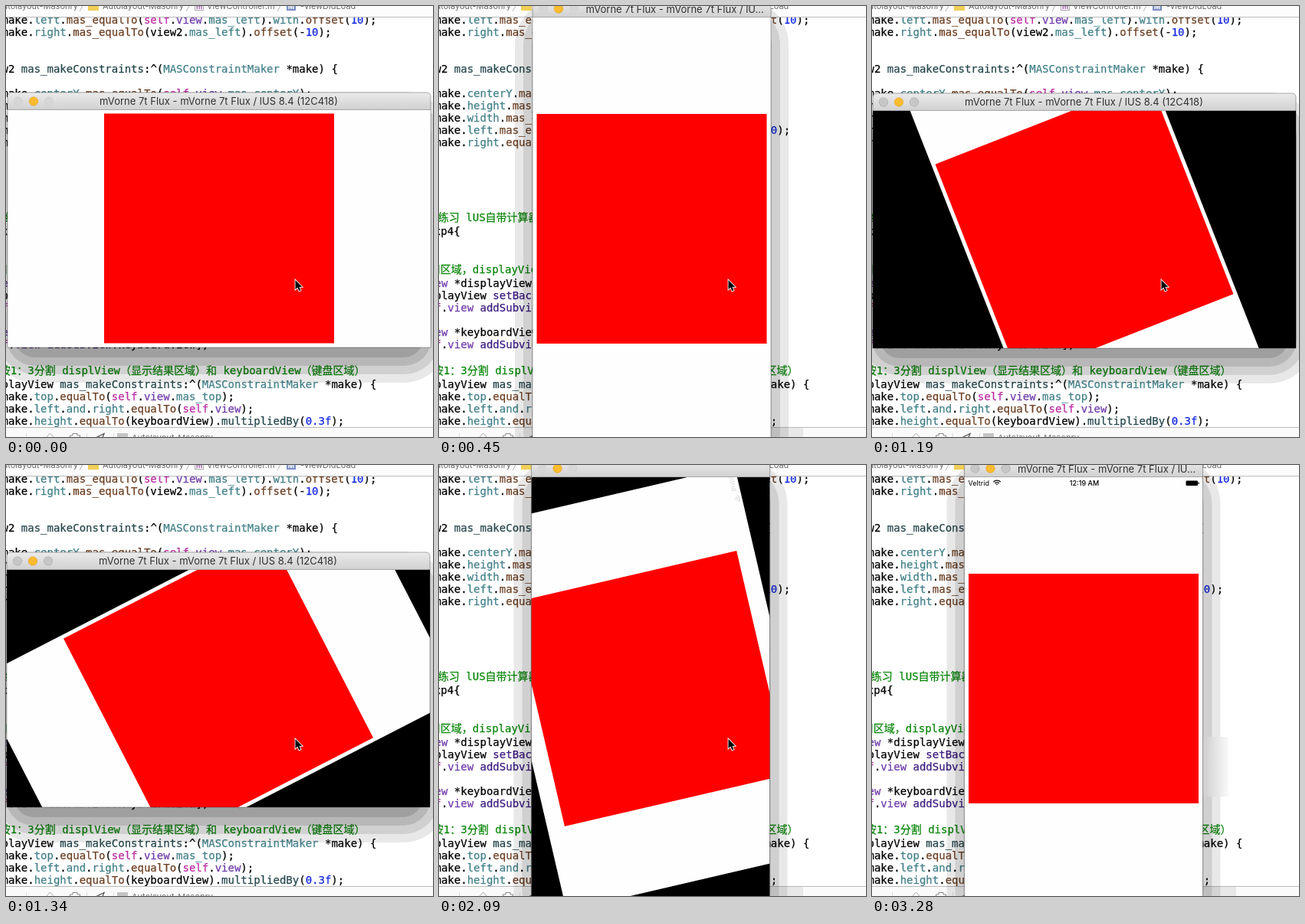
Write an HTML page with a canvas that moves like this. It is 557 px wide and 563 px high and loops after 3960 ms.

```html
<!DOCTYPE html>
<html lang="en">
<head>
<meta charset="utf-8">
<title>Rotating window</title>
<style>
html, body { margin: 0; width: 100%; height: 100%; overflow: hidden; background: #fff; }
canvas { display: block; width: 557px; height: 563px; }
</style>
</head>
<body>
<canvas id="stage" width="557" height="563"></canvas>
<script>
const ctx = document.getElementById('stage').getContext('2d');
const W = 557, H = 563, LOOP = 3960;
const LONG = 552, SHORT = 311, BAR = 23, SQUARE = 300;
const MONO = '14px "DejaVu Sans Mono", "Noto Sans CJK SC", "Noto Sans CJK", monospace';
const SANS = 'Inter, Roboto, sans-serif';
const DEVICE = 'mVorne 7t Flux - mVorne 7t Flux / ';

// Source code behind the window: [baseline, x, text]
const IN = -5.5, OUT = -39.2;
const CODE = [
  [23, IN, 'make.left.mas_equalTo(self.view.mas_left).with.offset(10);'],
  [39, IN, 'make.right.mas_equalTo(view2.mas_left).offset(-10);'],
  [87, OUT, '[view2 mas_makeConstraints:^(MASConstraintMaker *make) {'],
  [119, IN, 'make.centerY.mas_equalTo(self.view.mas_centerY);'],
  [135, IN, 'make.height.mas_equalTo(100);'],
  [151, IN, 'make.width.mas_equalTo(100);'],
  [167, IN, 'make.left.mas_equalTo(view1.mas_right).with.offset(10);'],
  [183, IN, 'make.right.equalTo(self.view);'],
  [281, -18, '//练习 lUS自带计算器'],
  [299, -82, '- (void)exp4{'],
  [349, -29, '//用区域，displayView'],
  [367, OUT, 'UIView *displayView = [UIView new];'],
  [383, OUT, '[displayView setBackgroundColor:color];'],
  [399, OUT, '[self.view addSubview:displayView];'],
  [431, OUT, 'UIView *keyboardView = [UIView new];'],
  [447, OUT, '[self.view addSubview:keyboardView];'],
  [481, -25, '//按1：3分割 displView（显示结果区域）和 keyboardView（键盘区域）'],
  [499, OUT, '[displayView mas_makeConstraints:^(MASConstraintMaker *make) {'],
  [515, IN, 'make.top.equalTo(self.view.mas_top);'],
  [531, IN, 'make.left.and.right.equalTo(self.view);'],
  [547, IN, 'make.height.equalTo(keyboardView).multipliedBy(0.3f);']
];
const RULES = [
  [/^\/\//, '#0b860b'],
  [/^(mas_equalTo|equalTo|offset)$/, '#6c4024'],
  [/^(self|void)$/, '#bb2ca2'],
  [/^(view|UIView)$/, '#703daa'],
  [/^(setBackgroundColor|addSubview)$/, '#3d1d81'],
  [/^(mas_makeConstraints|multipliedBy)$/, '#26474b'],
  [/^(left|right|top|height|width|with|and|centerY|mas_(left|right|top|centerY)|MASConstraintMaker)$/, '#438189'],
  [/^\d/, '#1428e0']
];

function text(str, x, y, font, color, align = 'left') {
  ctx.font = font;
  ctx.fillStyle = color;
  ctx.textAlign = align;
  ctx.fillText(str, x, y);
}

function rect(x, y, w, h, color) {
  ctx.fillStyle = color;
  ctx.fillRect(x, y, w, h);
}

function line(points, color, width = 1) {
  ctx.beginPath();
  points.forEach(p => ctx.lineTo(p[0], p[1]));
  ctx.strokeStyle = color;
  ctx.lineWidth = width;
  ctx.stroke();
}

function dot(x, y, r, fill, edge) {
  ctx.beginPath();
  ctx.arc(x, y, r, 0, 7);
  ctx.fillStyle = fill;
  ctx.fill();
  ctx.strokeStyle = edge;
  ctx.lineWidth = 0.7;
  ctx.stroke();
}

function drawCode() {
  for (const [y, x0, str] of CODE) {
    let x = x0;
    for (const token of str.match(/^\/\/.*|\d[\d.]*f?|\w+|\W/g)) {
      const rule = RULES.find(r => r[0].test(token));
      const color = rule ? rule[1] : '#000';
      text(token, x, y, MONO, color);
      // A hairline gives the heavier desktop rendering
      ctx.strokeStyle = color;
      ctx.lineWidth = 0.25;
      ctx.strokeText(token, x, y);
      x += ctx.measureText(token).width;
    }
  }
}

function drawEditor() {
  rect(0, 0, W, H, '#fff');
  drawCode();

  rect(0, 0, W, 14, '#fcfcfc');
  rect(0, 14, W, 1, '#bcbcbc');
  const font = '11px ' + SANS, grey = '#6c6c6c';
  text('Autolayout-Masonry', 94, 4, font, grey, 'right');
  text('Autolayout-Masonry', 126, 4, font, grey);
  text('ViewController.m', 262, 4, font, grey);
  text('-viewDidLoad', 384, 4, font, grey);
  for (const x of [99, 238, 357]) line([[x - 3, 7], [x + 4, -6]], '#b4b4b4');
  rect(107, -4, 14, 10, '#f0cf58');
  ctx.strokeStyle = '#aaa';
  ctx.strokeRect(246.5, -5.5, 11, 11);
  text('m', 252, 4, 'bold 9px ' + SANS, '#9b5aa5', 'center');
  rect(366, -5, 12, 11, '#7d8fc4');
  text('M', 372, 4, 'bold 9px ' + SANS, '#fff', 'center');

  rect(0, 551, W, 12, '#fafafa');
  rect(0, 550, W, 1, '#b8b8b8');
  for (const x of [26, 105, 140]) rect(x, 558, 1, 5, '#ddd');
  line([[53, 563], [57.5, 558], [62, 563]], '#aaa');
  line([[83.5, 563], [83.5, 561], [87, 561], [87, 558.5], [93, 558.5], [93, 561], [96.5, 561], [96.5, 563]], '#888');
  line([[117, 564], [128, 558.5], [125, 566]], '#555', 1.3);
  rect(145, 558, 14, 5, '#c4c4c4');
  text('Autolayout-Masonry', 164, 568, '11px ' + SANS, '#777');
}

// Cubic ease-in-out (.42, 0, .58, 1)
function ease(t) {
  let lo = 0, hi = 1;
  for (let i = 0; i < 24; i++) {
    const s = (lo + hi) / 2, q = 1 - s;
    if (3 * q * q * s * 0.42 + 3 * q * s * s * 0.58 + s * s * s < t) lo = s; else hi = s;
  }
  return lo * lo * (3 - 2 * lo);
}

function drawShadow(x, y, w, h) {
  const bands = [[23, 0.09], [12, 0.1], [1, 0.12], [-10, 0.13]];
  for (const [spread, alpha] of bands) {
    ctx.beginPath();
    ctx.roundRect(x - spread, y + 23 - spread, w + 2 * spread, h + 2 * spread, 35 + spread);
    ctx.fillStyle = `rgba(0,0,0,${alpha})`;
    ctx.fill();
  }
}

function drawTitleBar(x, top, w, title, active) {
  const fill = ctx.createLinearGradient(0, top, 0, top + BAR);
  fill.addColorStop(0, '#ebebeb');
  fill.addColorStop(1, '#d0d0d0');
  ctx.beginPath();
  ctx.roundRect(x, top, w, BAR, [5, 5, 0, 0]);
  ctx.fillStyle = fill;
  ctx.fill();
  rect(x, top + BAR - 1, w, 1, '#a8a8a8');

  const [grey, edge] = active ? ['#c6c6c6', '#adadad'] : ['#d6d6d6', '#d2d2d2'];
  dot(x + 14, top + 11.5, 5.7, grey, edge);
  dot(x + 34, top + 11.5, 5.7, '#fdbc30', '#e2a32a');
  dot(x + 54, top + 11.5, 5.7, grey, edge);

  if (!title) return;
  const font = '13px ' + SANS, color = '#303030';
  if (w === LONG) text(DEVICE + 'lUS 8.4 (12C418)', x + w / 2 - 0.5, top + 16, font, color, 'center');
  else text(DEVICE + 'lU...', x + 69.5, top + 17, font, color);
}

function drawStatus(w, h, alpha) {
  const left = -w / 2, top = -h / 2;
  ctx.globalAlpha = alpha;
  text('Veltrid', left + 5, top + 11, '9px ' + SANS, '#000');
  text('12:19 AM', 1, top + 11, '500 9px ' + SANS, '#000', 'center');
  ctx.lineWidth = 1.3;
  ctx.strokeStyle = '#000';
  for (const r of [1, 3.7, 6.4]) {
    ctx.beginPath();
    ctx.arc(left + 42.5, top + 10.5, r, -Math.PI * 0.76, -Math.PI * 0.24);
    ctx.stroke();
  }
  ctx.beginPath();
  ctx.roundRect(w / 2 - 22, top + 4.5, 15.5, 6.5, 1.2);
  ctx.fillStyle = '#000';
  ctx.fill();
  ctx.fillRect(w / 2 - 6, top + 6.5, 1.2, 2.5);
  ctx.globalAlpha = 1;
}

function drawScreen(x, y, w, h, pose) {
  const { angle = 0, mix = 0, status = 0 } = pose;
  const sw = w + (h - w) * mix, sh = h + (w - h) * mix;
  ctx.save();
  ctx.beginPath();
  ctx.rect(x, y, w, h);
  ctx.clip();
  rect(x, y, w, h, angle ? '#000' : '#fefefe');
  ctx.translate(x + w / 2, y + h / 2);
  ctx.rotate(angle * Math.PI / 180);
  // The turning sheet is slightly smaller than the window
  const inset = angle ? 0.5 : 0;
  rect(inset - sw / 2, inset - sh / 2, sw - 2 * inset, sh - 2 * inset, '#fefefe');
  rect(-SQUARE / 2, -SQUARE / 2, SQUARE, SQUARE, '#f00');
  if (status) drawStatus(sw, sh, status);
  ctx.restore();
}

function drawCursor() {
  ctx.save();
  ctx.translate(377.5, 358);
  ctx.scale(0.87, 0.87);
  ctx.beginPath();
  [[0, 0], [0, 14], [3.2, 11], [5.5, 16.5], [8, 15.5], [5.7, 10.3], [10, 10.2]].forEach(p => ctx.lineTo(...p));
  ctx.closePath();
  ctx.strokeStyle = '#fff';
  ctx.lineWidth = 2;
  ctx.stroke();
  ctx.fillStyle = '#000';
  ctx.fill();
  ctx.restore();
}

// Softer piece of shadow left at the right of the window
function drawSmear(full) {
  const fill = ctx.createLinearGradient(432, 0, 467, 0);
  fill.addColorStop(0, '#cdcdcd');
  fill.addColorStop(0.5, '#e6e6e6');
  fill.addColorStop(1, '#fcfcfc');
  rect(432, 355, 33, 59, fill);
  rect(432, 414, full ? 33 : 20, 19, fill);
}

const flip = step => ({ x: 1, y: 136, angle: 180 * ease(Math.min(1, 0.13 + 0.3 * step)) % 180 });
const turn = step => {
  const left = 1 - ease(0.265 + 0.6 * step);
  return { x: 120.5, y: 16, tall: true, angle: 90 * left, mix: left };
};
const upright = { x: 120.5, y: 16, tall: true, title: true, active: true, status: 1 };
const POSES = [
  [0, { x: 2, y: 135, title: true }],
  [300, { x: 122, y: 15, tall: true }],
  [450, { x: 122, y: 15, tall: true, title: true }],
  [1040, flip(0)],
  [1190, { ...flip(1), title: true, active: true }],
  [1340, { ...flip(2), title: true, active: true }],
  [1490, { x: 1, y: 136, title: true, active: true }],
  [2090, { ...turn(0), status: 0.14 }],
  [2240, { ...turn(1), title: true, active: true, status: 0.9 }],
  [2390, upright],
  [3140, { ...upright, smear: 1 }],
  [3280, { ...upright, smear: 2 }]
];

function draw(pose) {
  const { x, y, tall, title, active, smear } = pose;
  const w = tall ? SHORT : LONG, h = tall ? LONG : SHORT;
  // In landscape the bar covers the first row of the screen
  const top = tall ? y - BAR : y - BAR + 1;
  drawEditor();
  if (tall) rect(432, 551, 43, 12, 'rgba(0,0,0,.07)');
  drawShadow(x, y - BAR, w, h + BAR);
  if (smear) drawSmear(smear === 2);
  drawScreen(x, y, w, h, pose);
  drawTitleBar(x, top, w, title, active);
  ctx.beginPath();
  ctx.roundRect(x, top, w, y + h - top, [5, 5, 0, 0]);
  ctx.strokeStyle = 'rgba(0,0,0,.3)';
  ctx.lineWidth = 1;
  ctx.stroke();
  if (!smear) drawCursor();
}

let shown;
function tick() {
  const t = performance.now() % LOOP;
  const pose = POSES.findLast(p => p[0] <= t)[1];
  if (pose !== shown) draw(shown = pose);
  requestAnimationFrame(tick);
}
tick();
</script>
</body>
</html>
```
